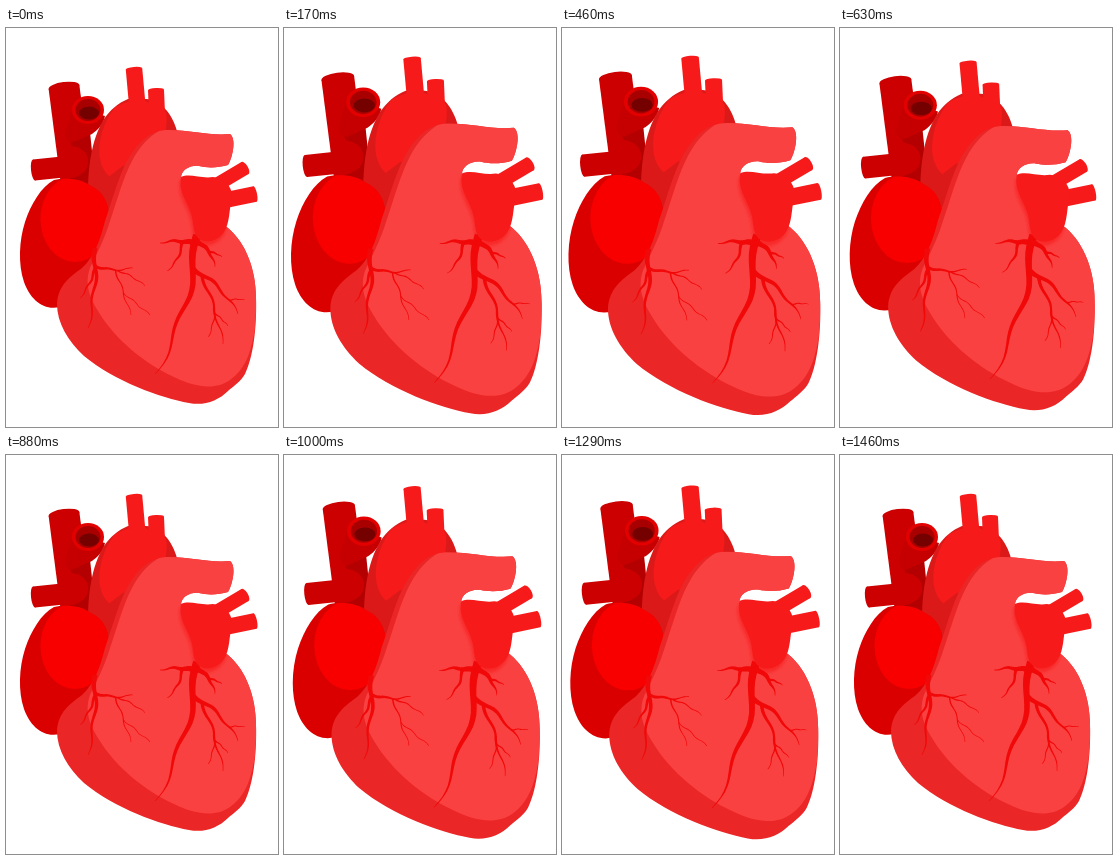
These frames come from a looping animation (272 px wide and 399 px high, 1500 ms). An HTML page:

```html
<!DOCTYPE html>
<html lang="en">
<head>
<meta charset="utf-8">
<title>Beating heart</title>
<style>
html, body { margin: 0; width: 100%; height: 100%; overflow: hidden; background: #fff; }
svg { display: block; width: 100%; height: 100%; }
</style>
</head>
<body>
<svg viewBox="0 0 272 399">
  <defs>
    <clipPath id="bulbClip">
      <path id="bulb" d="M82 168C82 140 85 112 98 91C104 82 112 75 122 71H140C156 72 168 88 172 107L130 140L104 188Z"/>
    </clipPath>
    <clipPath id="bodyClip">
      <path id="body" d="M163 102C185 102 204 108 224 106C231 111 226 131 222 137C212 140 201 140 193 138C184 137 175 142 175 150L195 180L222 200C240 215 250 242 250 270C251 300 247 330 239 346C235 353 228 358 222 363C212 373 198 378 183 375C155 370 108 353 78 328C62 313 51 295 51 276C52 257 64 249 76 240C88 229 94 213 99 193C107 170 112 150 121 133C133 112 145 102 163 102Z"/>
    </clipPath>
    <path id="ventricle" d="M48 152C60 149 76 151 85 158C96 163 103 174 103 189L98 222L65 260L54 279C37 283 24 271 18 254C12 236 13 213 19 194C25 176 35 159 48 152Z"/>
    <clipPath id="ventricleClip"><use href="#ventricle"/></clipPath>
    <filter id="soft" x="-20%" y="-20%" width="140%" height="140%"><feGaussianBlur stdDeviation="1.6"/></filter>
  </defs>
  <g id="heart">
    <g id="veins"></g>
    <g>
      <path d="M72 80L60 106L66 118C82 120 86 134 79 143C72 150 64 150 58 152V166H84L89 152L84 104Z" fill="#b40000"/>
      <path d="M67 78L59 104C58 112 64 117 70 113L86 106C92 102 98 95 99 88Z" fill="#c60000"/>
      <ellipse cx="82" cy="82" rx="16" ry="14" fill="#e30000"/>
      <ellipse cx="82" cy="82" rx="12.500" ry="11" fill="#a80000"/>
      <ellipse cx="83" cy="85" rx="10" ry="6.500" fill="#740000"/>
    </g>

    <use href="#bulb" fill="#dc1919"/>
    <g id="aorta"></g>
    <ellipse cx="127" cy="107" rx="30" ry="48" transform="rotate(24 127 107)" fill="#f71a1a" clip-path="url(#bulbClip)"/>

    <use href="#ventricle" fill="#db0000"/>
    <ellipse cx="69" cy="191" rx="34.500" ry="43" fill="#f90000" clip-path="url(#ventricleClip)"/>

    <use href="#body" fill="#ea2626"/>
    <g clip-path="url(#bodyClip)">
      <path d="M104 193C98 213 90 227 84 240C79 254 82 267 92 283C110 313 140 336 168 349C190 360 210 362 224 352C238 342 245 327 249 300L255 190L240 95H168C150 103 137 112 126 133C117 150 112 170 104 193Z" fill="#fa4141"/>
      <use href="#atrium" x="-1" y="4" fill="#c91c1c" opacity=".65" filter="url(#soft)"/>
    </g>
    <g id="vessels" fill="#f10808"/>
    <g id="branches"></g>
    <path id="atrium" d="M175 149C184 145 195 151 207 149C218 150 226 158 226 168C223 182 224 195 218 204C212 213 202 215 195 212C187 208 188 198 186 189C183 175 172 165 175 149Z"/>
  </g>
</svg>
<script>
const $ = id => document.getElementById(id);
const heart = $('heart');
$('atrium').style.fill = $('atrium').getAttribute('fill') || '';

function add(group, tag, attrs) {
  const el = document.createElementNS('http://www.w3.org/2000/svg', tag);
  for (const key in attrs) el.setAttribute(key, attrs[key]);
  $(group).append(el);
}

// Straight tube whose far end is slightly domed
function tube(group, color, x1, y1, x2, y2, w, dome) {
  const turn = Math.atan2(y2 - y1, x2 - x1) * 180 / Math.PI;
  add(group, 'line', { x1, y1, x2, y2, stroke: color, 'stroke-width': w });
  add(group, 'ellipse', { cx: x2, cy: y2, rx: dome, ry: w / 2, fill: color, transform: `rotate(${turn} ${x2} ${y2})` });
}

// Tapered vessel: a bowed, slightly wavy line that other vessels can leave from
function vessel(x0, y0, x1, y1, w, bow) {
  const dx = x1 - x0, dy = y1 - y0, len = Math.hypot(dx, dy);
  const width = s => .6 + (w - .6) * (1 - s);
  const at = s => {
    const side = 2 * s * (1 - s) * bow - .02 * Math.sin(4 * Math.PI * s);
    return [x0 + dx * s + dy * side, y0 + dy * s - dx * side];
  };
  const left = [], right = [];
  for (let k = 0; k <= 24; k++) {
    const s = k / 24, [x, y] = at(s);
    const h = width(s) / 2 / len;
    left.push([x + dy * h, y - dx * h]);
    right.unshift([x - dy * h, y + dx * h]);
  }
  add('vessels', 'polygon', { points: left.concat(right).map(p => p.map(v => v.toFixed(1))).join(' ') });
  return { fork: (s, x, y, bend) => vessel(...at(s), x, y, width(s) * .8, bend) };
}

tube('veins', '#cc0000', 71, 160, 58, 59, 31, 5);
tube('aorta', '#f71a1a', 132, 85, 128, 41, 16.5, 2);
tube('aorta', '#f71a1a', 151, 85, 150, 62, 16, 2);
tube('branches', '#f71a1a', 212, 156, 239, 140, 14, 3);
tube('branches', '#f71a1a', 215, 173, 249, 166, 16, 2);
$('atrium').style.fill = '#f71a1a';
tube('veins', '#cc0000', 76, 137, 28, 142, 21, 3);

const main = vessel(191, 207, 149, 346, 8, .12);
main.fork(.06, 154, 215, -.12).fork(.35, 161, 243, .2);
main.fork(.04, 209, 239, .25).fork(.5, 216, 229, .1);
const outer = main.fork(.23, 232, 286, .15);
outer.fork(.75, 239, 272, .1);
const lower = outer.fork(.18, 217, 316, .05);
lower.fork(.45, 202, 309, .15);
lower.fork(.55, 222, 298, .05);

const side = vessel(89, 220, 82, 300, 5, .07);
side.fork(.25, 74, 270, .1);
const upper = side.fork(.22, 127, 240, -.15);
upper.fork(.6, 139, 258, .1);
upper.fork(.55, 125, 287, 0).fork(.5, 144, 287, 0);

// A loop of 36 steps: a beat with a slow release, then a quick one
const LOOP = 1500, STEPS = 36, SLOW = 21, QUICK = 14, RISE = 6.5, SWELL = .1;

function growth(k) {
  const len = k < SLOW ? SLOW : QUICK;
  const t = k < SLOW ? k : k - SLOW;
  const fall = Math.max(0, (len - t) / (len - RISE));
  return SWELL * Math.min(t / RISE, fall ** 1.1);
}

function draw(ms) {
  const k = Math.floor((ms % LOOP + 5) * STEPS / LOOP) % STEPS;
  heart.setAttribute('transform', `translate(127 207) scale(${1 + growth(k)}) translate(-127 -207)`);
}

let start;
function tick(now) {
  start ??= now;
  draw(now - start);
  requestAnimationFrame(tick);
}
draw(0);
requestAnimationFrame(tick);
</script>
</body>
</html>
```
